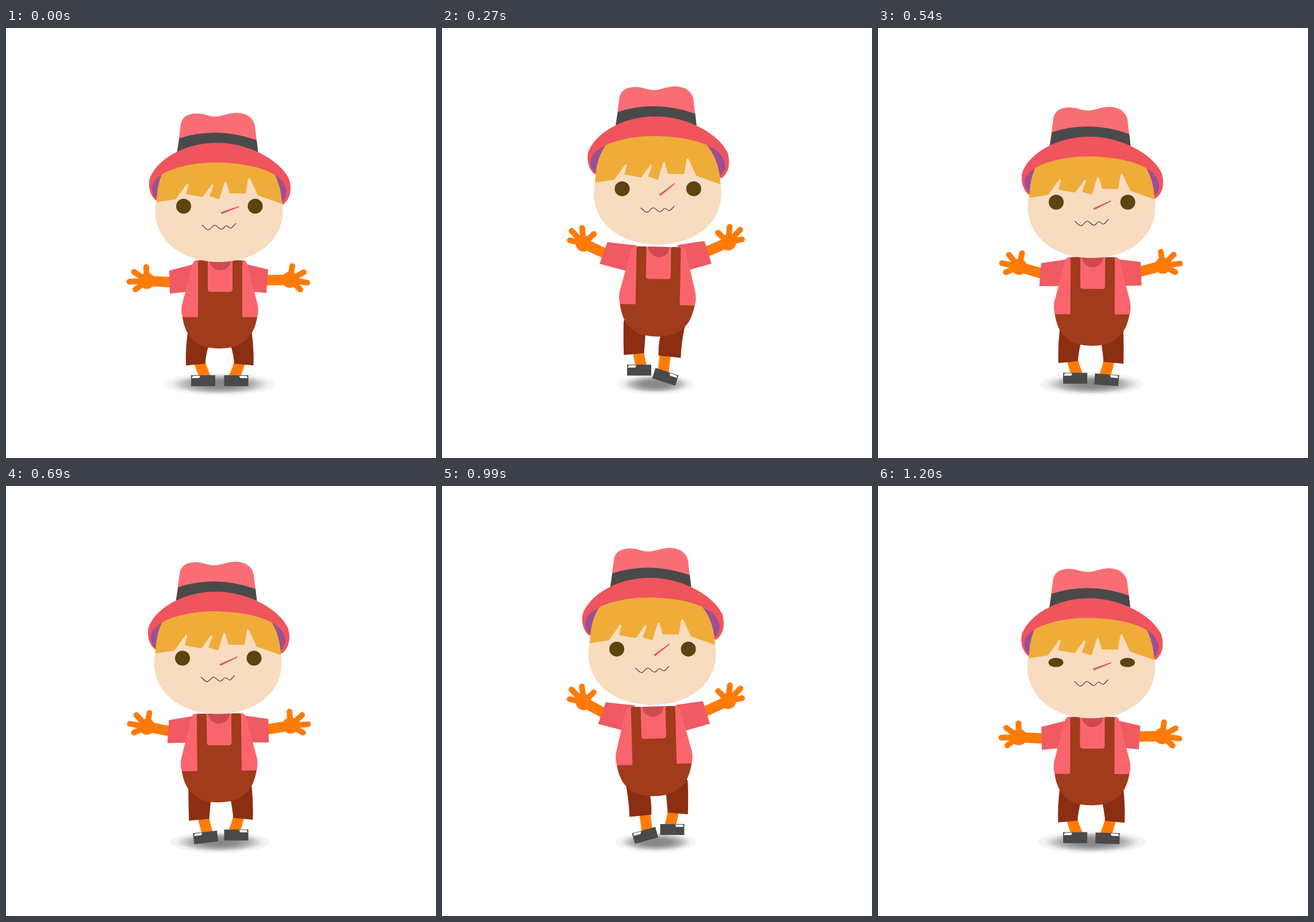
These frames come from a looping animation (748x748 px, 1230 ms). An HTML page:

```html
<!DOCTYPE html>
<html lang="en">
<head>
<meta charset="utf-8">
<title>Hopping boy</title>
<style>
html, body { margin: 0; width: 100%; height: 100%; overflow: hidden; background: #fff; }
svg { display: block; width: 100vw; height: 100vh; }
</style>
</head>
<body>
<svg viewBox="0 0 748 748" xmlns="http://www.w3.org/2000/svg">
  <defs>
    <radialGradient id="shade">
      <stop offset="0" stop-color="#868686"/>
      <stop offset=".35" stop-color="#8e8e8e"/>
      <stop offset=".6" stop-color="#b4b4b4"/>
      <stop offset=".78" stop-color="#dedede"/>
      <stop offset=".87" stop-color="#f2f2f2"/>
      <stop offset="1" stop-color="#f6f6f6"/>
    </radialGradient>
    <g id="hand" stroke="#ff7b08" stroke-width="10" stroke-linecap="round" fill="#ff7b08">
      <circle r="9"/>
      <path d="M0 0L4 -24M0 0L24 -13M0 0L30 5M0 0L18 17" fill="none"/>
    </g>
    <g id="shoe">
      <rect x="-21" y="-9.5" width="42" height="19" fill="#4a4a4a"/>
      <path d="M-18 -8.5H-5L-7 -4.5H-20Z" fill="#fff"/>
    </g>
  </defs>

  <ellipse id="shadow" cx="372" cy="619.5" fill="url(#shade)"/>
  <g id="hatBack">
    <path d="M261 300C249 290 246 270 252 257L363 225L492 262C498 282 494 298 482 307Z" fill="#f0545c"/>
    <path d="M262 298C249 284 252 270 260 262C290 242 320 234 363 234C410 234 455 243 477 262C491 276 491 292 481 301Z" fill="#9b4f96"/>
  </g>

  <g id="legL"><path class="ankle" fill="none" stroke="#ff7b08" stroke-width="19"/><path class="pants" fill="#8b2e11"/><use class="foot" href="#shoe"/></g>
  <g id="legR" transform="translate(743.5 0) scale(-1 1)"><path class="ankle" fill="none" stroke="#ff7b08" stroke-width="19"/><path class="pants" fill="#8b2e11"/><use class="foot" href="#shoe"/></g>

  <g id="armL"><path class="fore" stroke="#ff7b08" stroke-width="18"/><use class="palm" href="#hand"/><path class="sleeve" d="M284 422L334 409L340 456L285 462Z" fill="#ef5a63"/></g>
  <g id="armR"><path class="fore" stroke="#ff7b08" stroke-width="18"/><use class="palm" href="#hand"/><path class="sleeve" d="M456 420L410 409L402 456L453 461Z" fill="#ef5a63"/></g>

  <g id="torso">
    <path d="M331 404Q325 404 322 420L306 482Q304 492 307 504H437Q440 492 438 482L422 420Q419 404 413 404Z" fill="#fa656d"/>
    <path d="M354 404A18.5 17.5 0 0 0 391 404Z" fill="#cf4a50"/>
    <path d="M307 503H334V407Q334 404 337 404H348Q351 404 351 407V454Q351 459 356 459H389Q394 459 394 454V407Q394 404 397 404H408Q411 404 411 407V503H437C432 530 422 541 410 548Q398 557 371 557.5Q345 557 332 548C322 541 311 530 307 503Z" fill="#a03b1c"/>
  </g>

  <g id="head">
    <path d="M259.5 318C259.5 264 307 233 370.5 233C434 233 481.5 264 481.5 318C481.5 370 435 407 370.5 407C306 407 259.5 370 259.5 318Z" fill="#f7dcc0"/>
    <ellipse class="eye" cx="309" cy="310" rx="13" fill="#5c4310"/>
    <ellipse class="eye" cx="433.5" cy="310" rx="13" fill="#5c4310"/>
    <path id="nose" d="M375 320.6Q373.4 322 375 323.4L407 322.6V321.4Z" fill="#e6515b" stroke="#e6515b" stroke-width=".6" stroke-linejoin="round"/>
    <path d="M341 343C346 346 348 351 352 351C356 351 359 343 363 343C367 343 370 350 375 350C379 350 380 344 383 344C387 344 387 348 391 348C394 348 397 342 400 340" fill="none" stroke="#4a2c10" stroke-width="1.1"/>
  </g>
  <path id="hair" d="M262 303Q263 251 290 228Q371 180 448 230Q478 256 480 306L438 291L425 263Q423 259 421 263L417 288L389 287.5L383.5 269Q382 265 380 269L371 298L354 292.5L361 274Q360 270 357.5 273L342 294L313 289L317 273Q316 269 314 272L295 298Z" fill="#efac39"/>

  <g id="hat">
    <path d="M298 214L304 168Q307 149 332 148.5C346 149 353 154 364 154C376 154 385 148 402 147.5Q428 149 433 170L438 214Q367 186 298 214Z" fill="#f96e74"/>
    <path d="M301.5 192Q366 170.5 436 195L438.5 216Q367 187 297.5 216Z" fill="#4a4a4a"/>
    <path d="M261 300C249 290 246 270 252 257C266 228 310 199.7 367 199.7C425 199.7 478 232 492 262C498 282 494 298 482 307C490 295 492 278 477 262C455 243 410 234 363 234C320 234 275 246 260 264C250 276 254 290 261 300Z" fill="#f0545c"/>
  </g>
</svg>
<script>
const LOOP = 1230, STEP = 30, HOP = 588;
const LIFT = [[0, 0], [24, .09], [102, .32], [150, .56], [282, .95], [320, 1], [390, .84], [492, .42], [HOP, 0]];
const WAVE = [[0, 0], [24, .02], [102, .23], [150, .53], [282, .96], [335, 1], [390, .95], [492, .53], [HOP, 0]];
const BLINK = [[0, 1], [24, .62], [75, .15], [120, .13], [150, .23], [225, 1]];

const $ = id => document.getElementById(id);
const put = (el, attrs) => { for (const a in attrs) el.setAttribute(a, attrs[a]); };
const move = (el, x, y, rest = '') => put(el, { transform: `translate(${x} ${y}) ${rest}` });

function linear(keys, t) {
  const i = keys.findIndex(k => k[0] > t);
  if (i < 0) return keys[keys.length - 1][1];
  const [a, b] = [keys[i - 1], keys[i]];
  return a[1] + (b[1] - a[1]) * (t - a[0]) / (b[0] - a[0]);
}

// Cubic through the keys, slopes taken from neighbouring keys
function smooth(keys, t) {
  const last = keys.length - 1;
  const i = Math.max(0, Math.min(last, keys.findIndex(k => k[0] > t)) - 1);
  const slope = j => {
    const p = keys[Math.max(0, j - 1)], q = keys[Math.min(last, j + 1)];
    return keys[j][1] === 1 ? 0 : (q[1] - p[1]) / (q[0] - p[0]);
  };
  const [a, b] = [keys[i], keys[i + 1]];
  const d = b[0] - a[0], u = (t - a[0]) / d, v = 1 - u;
  return v * v * (1 + 2 * u) * a[1] + u * u * (3 - 2 * u) * b[1]
    + d * u * v * (v * slope(i) - u * slope(i + 1));
}

// Both legs are posed as a left leg; the right group is mirrored
function leg(g, k, stands) {
  const at = (x, y, sx, sy, lx, ly) => stands ? [x + sx * k, y - sy * k] : [x + lx * k, y - ly * k];
  const top = at(316, 530, 4, 18, 0, 22);
  const out = at(313, 587, 16.5, 14.5, 3.5, 20);
  const inn = at(346.5, 584, 22, 15.5, 5.5, 20);
  const crotch = at(352, 554, 13, 19, 2, 22);
  const foot = at(343, 613.5, 13, 7.3, 0, 20);
  const ax = (out[0] + inn[0]) / 2 + 7.5, ay = inn[1] - 4;
  put(g.querySelector('.pants'), {
    d: `M${top}Q${out[0] - 1} ${(top[1] + out[1]) / 2} ${out}L${inn}Q${inn[0] + 1} ${inn[1] - 14} ${crotch}L370 ${crotch[1] - 18}L330 ${top[1] - 18}Z`
  });
  put(g.querySelector('.ankle'), { d: `M${ax} ${ay}Q${ax + 1} ${ay + 9} ${foot[0] + 4} ${foot[1] - 5}` });
  move(g.querySelector('.foot'), foot[0], foot[1], `rotate(${stands ? -19.5 * k : 0})`);
}

function arm(g, side, pivot, elbow, palm, turn, spin, dx, dy) {
  const a = -side * turn, r = a * Math.PI / 180;
  const x = elbow[0] - pivot[0], y = elbow[1] - pivot[1];
  const ex = pivot[0] + dx + x * Math.cos(r) - y * Math.sin(r);
  const ey = pivot[1] + dy + x * Math.sin(r) + y * Math.cos(r);
  move(g.querySelector('.sleeve'), dx, dy, `rotate(${a} ${pivot})`);
  put(g.querySelector('.fore'), { d: `M${ex} ${ey}L${palm}` });
  move(g.querySelector('.palm'), palm[0], palm[1], `scale(${side} 1) rotate(${-spin})`);
}

function draw(t) {
  const cycle = t % (2 * HOP), first = cycle < HOP, phase = cycle % HOP;
  const k = smooth(LIFT, phase), n = Math.max(0, smooth(WAVE, phase)), h = 50 * k;
  const open = linear(BLINK, cycle);

  put($('shadow'), { rx: 98 - .68 * h, ry: 20 - .055 * h });

  const headX = (first ? 4.8 : -6.2) * k;
  move($('head'), headX, -.66 * h);
  move($('hair'), headX, -.74 * h);
  move($('hat'), headX, -h);
  move($('hatBack'), headX, -h);
  document.querySelectorAll('.eye').forEach(e => put(e, { ry: 13 * open }));
  move($('nose'), 0, -.03 * h, `rotate(${-20.5 - 18.5 * n} 375 322)`);

  const tilt = (first ? 1.3 : -1.9) * k;
  move($('torso'), 372 + (first ? 1.5 : -1.6) * k, 558 - .45 * h,
    `rotate(${tilt}) scale(1 ${1 + .02 * k}) translate(-372 -558)`);

  leg($('legL'), k, !first);
  leg($('legR'), k, first);

  const dx = first ? 3 * k : 0, dy = -.55 * h, rise = 69 * Math.pow(n, .8);
  arm($('armL'), -1, [350, 412], [305, 443], [245 + 1.5 * n, 440 - rise], 22.5 * n, 7 + 53 * n, dx, dy);
  arm($('armR'), 1, [392, 414], [435, 439], [494 + 4 * n, 438 - rise], 23.5 * n, 60 * n, dx, dy);
}

let start;
function tick(now) {
  if (start === undefined) start = now;
  draw(Math.floor((now - start) % LOOP / STEP) * STEP);
  requestAnimationFrame(tick);
}
draw(0);
requestAnimationFrame(tick);
</script>
</body>
</html>
```
